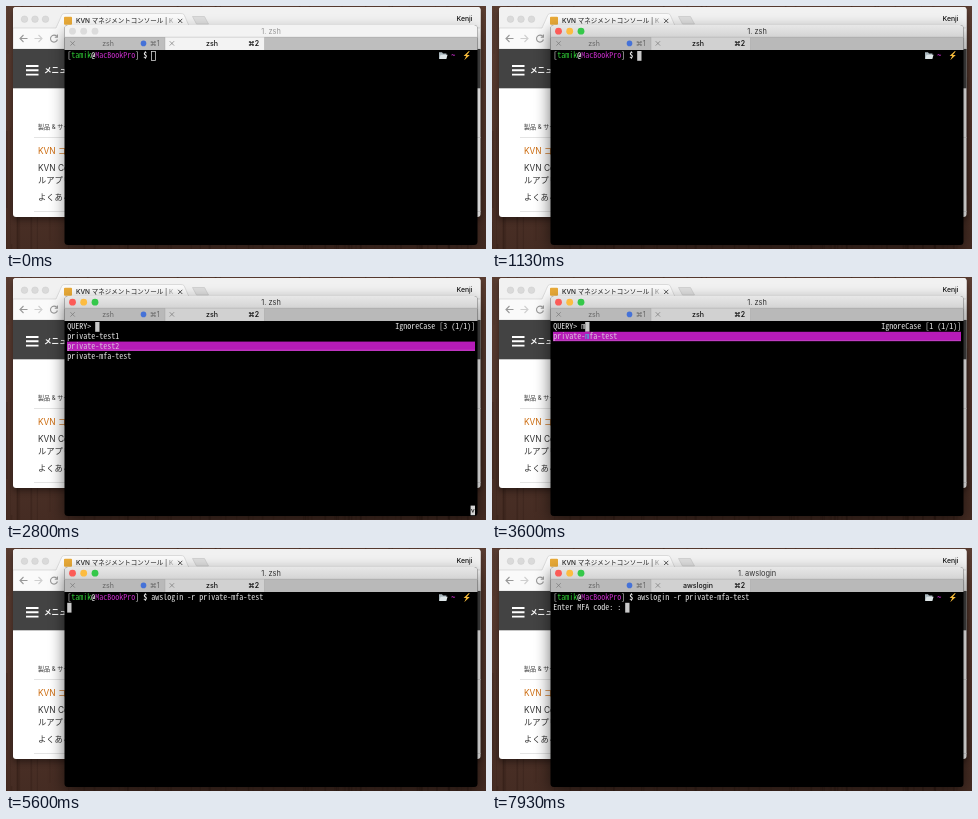
An HTML page for the animation above (8000 ms loop, 480 px wide and 243 px high).

```html
<!DOCTYPE html>
<html lang="ja">
<head>
<meta charset="utf-8">
<style>
html, body { margin: 0; width: 100%; height: 100%; overflow: hidden; background: #45291f; }
svg { display: block; width: 480px; height: 243px; }
text { white-space: pre; }
.ui { font-family: Inter, "Noto Sans CJK JP", "Noto Sans", sans-serif; }
.bar { font-family: Inter, "Noto Sans", "DejaVu Sans", sans-serif; }
.mono { font-family: "Noto Sans Mono CJK JP", "Noto Sans Mono", monospace; }
.mid { text-anchor: middle; }
</style>
</head>
<body>
<svg viewBox="0 0 480 243" width="480" height="243">
  <defs>
    <linearGradient id="wood" x2="0" y2="1">
      <stop offset="0" stop-color="#5a3d32"/>
      <stop offset=".6" stop-color="#503329"/>
      <stop offset="1" stop-color="#452c23"/>
    </linearGradient>
    <linearGradient id="titleOn" x2="0" y2="1">
      <stop offset="0" stop-color="#e9e9e9"/>
      <stop offset="1" stop-color="#d3d3d3"/>
    </linearGradient>
    <linearGradient id="fade">
      <stop offset="0" stop-color="#fafafa" stop-opacity="0"/>
      <stop offset="1" stop-color="#fafafa"/>
    </linearGradient>
    <filter id="blur" x="-20%" y="-20%" width="140%" height="140%"><feGaussianBlur stdDeviation="8"/></filter>
    <filter id="soft" x="-5%" y="-10%" width="110%" height="120%"><feGaussianBlur stdDeviation="3"/></filter>
    <clipPath id="page"><rect x="7" y="1" width="467.5" height="210" rx="3"/></clipPath>
    <clipPath id="win"><rect x="58.5" y="19" width="413" height="220" rx="3.5"/></clipPath>
  </defs>

  <rect width="480" height="243" fill="url(#wood)"/>
  <g id="grain" stroke="#24130d"></g>

  <rect x="7" y="4" width="467.5" height="210" rx="3" opacity=".4" filter="url(#soft)"/>
  <g clip-path="url(#page)" class="ui">
    <rect x="7" y="1" width="468" height="210" fill="#fff"/>
    <rect x="7" y="1" width="468" height="21" fill="#f1f1f1"/>
    <path d="M7 22H50L56 8.5Q57 7.5 59 7.5H175Q177 7.5 178 8.5L184 22H475V43H7Z" fill="#fafafa" stroke="#c9c9c9" stroke-width=".6"/>
    <path d="M186.5 10.5H198.5L202.5 18H190.5Z" fill="#dedede" stroke="#c4c4c4" stroke-width=".6"/>
    <g fill="#dadada" stroke="#c8c8c8" stroke-width=".4">
      <circle cx="18.5" cy="13.2" r="3.3"/><circle cx="29" cy="13.2" r="3.3"/><circle cx="39.5" cy="13.2" r="3.3"/>
    </g>
    <rect x="58" y="10.8" width="8" height="8" rx="1" fill="#e9aa38"/>
    <text x="70" y="17.1" font-size="6.5" font-weight="500" fill="#222">KVN マネジメントコンソール | K</text>
    <rect x="157" y="9" width="13" height="12" fill="url(#fade)"/>
    <path d="M172.1 12.8l4.2 4.2m0-4.2l-4.2 4.2" stroke="#444" stroke-width=".9"/>
    <text x="458.5" y="15.4" font-size="6.8" font-weight="500" fill="#111" class="mid">Kenji</text>
    <g fill="none" stroke-width="1.1">
      <path d="M21.5 32.5H14M17.5 29L14 32.5L17.5 36" stroke="#999"/>
      <path d="M28.5 32.5H36M32.5 29L36 32.5L32.5 36" stroke="#cfcfcf"/>
      <path d="M50.7 30.4A3.5 3.5 0 1 0 51.4 33.5M51.4 28.6V31.2H48.8" stroke="#999"/>
    </g>
    <rect x="7" y="43" width="468" height="39.3" fill="#434343"/>
    <path d="M20 60H32.5M20 64.3H32.5M20 68.6H32.5" stroke="#fff" stroke-width="1.9"/>
    <text x="38" y="67.3" font-size="7.6" font-weight="700" fill="#fff">メニュー</text>
    <text x="32" y="123.3" font-size="6" fill="#333">製品 &amp; サービス</text>
    <path d="M28 131.5H475M28 205.5H475" stroke="#ddd" stroke-width=".8"/>
    <g font-size="8.3" fill="#333">
      <text x="32" y="148.3" fill="#cc6a0c">KVN コンソール</text>
      <text x="32" y="165.2">KVN Console</text>
      <text x="32" y="177.3">ルアプリ</text>
      <text x="32" y="194.3">よくある質問</text>
    </g>
  </g>

  <rect id="shadow" x="58.5" y="25" width="413" height="217" rx="4" filter="url(#blur)"/>
  <g clip-path="url(#win)">
    <rect x="58" y="18" width="414" height="222"/>
    <rect id="titleBar" x="58" y="18" width="414" height="13.5"/>
    <rect id="tabs" x="58" y="31" width="414" height="13"/>
    <rect id="tab2" x="159" y="31" width="99.5" height="13"/>
    <path d="M58 31.2H472M159 31V44M258.5 31V44" stroke="#999" stroke-width=".5" opacity=".7"/>
    <g id="lights"><circle cx="66.5" cy="25.2" r="3.4"/><circle cx="77.7" cy="25.2" r="3.4"/><circle cx="89" cy="25.2" r="3.4"/></g>
    <g class="bar" font-size="7">
      <text id="title" x="265" y="28" font-size="7.4" class="mid"></text>
      <text x="102" y="39.9" fill="#666" class="mid">zsh</text>
      <text id="tabName" x="206" y="39.9" fill="#111" font-weight="500" class="mid"></text>
      <circle cx="137.5" cy="37.4" r="2.8" fill="#4572d8"/>
      <text x="148.8" y="39.9" fill="#666" class="mid">⌘1</text>
      <text x="247.5" y="39.9" fill="#111" font-weight="600" class="mid">⌘2</text>
    </g>
    <path d="M64.4 35.2l4.4 4.4m0-4.4l-4.4 4.4M163.7 35.2l4.4 4.4m0-4.4l-4.4 4.4" stroke="#777" stroke-width=".7"/>
    <g id="screen" class="mono"></g>
  </g>
</svg>
<script>
const LOOP = 8000, CELL = 4, ROW = 9.8, LEFT = 61.2, TOP = 45;
const WHITE = '#e6e6e6', GREEN = '#2fce35', MAGENTA = '#c42cc6', CYAN = '#35c9dc', BAR = '#b61bb8';
const $ = id => document.getElementById(id);
const set = (id, attr, value) => $(id).setAttribute(attr, value);
const px = col => LEFT + col * CELL;
const py = row => TOP + row * ROW;

// pick the type size that makes one character fill one cell
const pen = document.createElement('canvas').getContext('2d');
pen.font = '100px "Noto Sans Mono CJK JP", "Noto Sans Mono", monospace';
set('screen', 'font-size', CELL * 100 / pen.measureText('0').width);

let seed = 7;
const rand = () => (seed = seed * 16807 % 2147483647) / 2147483647;
let grain = '';
for (let i = 0; i < 150; i++) {
  const x = rand() * 480, y = rand() * 300 - 60;
  grain += `<path d="M${x} ${y}v${40 + rand() * 160}" stroke-width="${.5 + rand() * 1.5}" opacity="${.1 + rand() * .2}"/>`;
}
$('grain').innerHTML = grain;

const esc = s => s.replace(/&/g, '&amp;').replace(/>/g, '&gt;');
const put = (col, row, s, fill = WHITE, weight = 400) =>
  `<text x="${px(col)}" y="${py(row) + 7.4}" fill="${fill}" font-weight="${weight}">${esc(s)}</text>`;

const cursor = (col, row, hollow) => hollow
  ? `<rect x="${px(col) + .3}" y="${py(row) + .5}" width="${CELL}" height="9" fill="none" stroke="#d0d0d0" stroke-width=".8"/>`
  : `<rect x="${px(col)}" y="${py(row)}" width="${CELL + .3}" height="${ROW}" fill="#c9c9c9"/>`;

const status = `<path d="M433 46.2h3l1 1.2h3.4v5.4h-7.4z" fill="#a9b7bd"/>
  <path d="M434.6 48.8h7l-1.4 4.2h-7z" fill="#dce4e6"/>
  <path d="M462.6 45.2l-5 4.9h2.6l-2 4.1 5.6-5.2h-2.9l2.9-3.8z" fill="#f4b93a"/>` + put(96, 0, '~', MAGENTA, 700);

const prompt = () => put(0, 0, '[') + put(1, 0, 'tamik', GREEN) + put(6, 0, '@', WHITE, 700) +
  put(7, 0, 'MacBookPro', MAGENTA) + put(17, 0, ']') + put(19, 0, '$', WHITE, 700) + status;

function picker(query, selected) {
  const items = ['private-test1', 'private-test2', 'private-mfa-test'].filter(s => s.includes(query));
  let out = put(0, 0, 'QUERY> ' + query) + cursor(7 + query.length, 0) +
    put(82, 0, `IgnoreCase [${items.length} (1/1)]`);
  items.forEach((item, i) => {
    const row = i + 1, on = i === selected, y = py(row);
    if (on) out += `<rect x="61" y="${y}" width="408" height="9.4" fill="${BAR}"/>
      <path d="M61 ${y + 8.6}H469" stroke="#e4b4e4" stroke-width=".5" opacity=".5"/>`;
    out += put(0, row, item, on ? '#dcc3dc' : WHITE);
    if (query) {
      const at = item.indexOf(query);
      out += `<rect x="${px(at)}" y="${y}" width="${query.length * CELL}" height="8.3" fill="${BAR}"/>` +
        put(at, row, query, CYAN);
    }
  });
  if (!query) out += `<rect x="464.6" y="228.6" width="4.4" height="9.6" fill="#d4d4d4"/>
    <path d="M465.4 232l1.4 3.4 1.4-3.4" fill="none" stroke="#222" stroke-width=".8"/>`;
  return out;
}

function screen(t) {
  if (t < 2400) return prompt() + cursor(21, 0, t < 270);
  if (t < 5530) {
    const query = 'mfa'.slice(0, [3330, 3870, 4130].filter(at => t >= at).length);
    return picker(query, t >= 2670 && !query ? 1 : 0);
  }
  const run = prompt() + put(21, 0, 'awslogin -r private-mfa-test');
  if (t < 6070) return run + cursor(0, 1);
  return run + put(0, 1, 'Enter MFA code: : ') + cursor(18, 1, t >= 6470 && t < 7130);
}

let last = '';
function draw(t) {
  const active = t >= 270;
  const name = t < 5870 ? 'zsh' : 'awslogin';
  const tab = t < 5730 ? 'zsh' : 'awslogin';
  const body = screen(t);
  const key = active + name + tab + body;
  if (key === last) return;
  last = key;
  set('shadow', 'opacity', active ? .58 : .4);
  set('titleBar', 'fill', active ? 'url(#titleOn)' : '#f3f3f3');
  set('tabs', 'fill', active ? '#b9b9b9' : '#bebebe');
  set('tab2', 'fill', active ? '#d1d1d1' : '#f3f3f3');
  set('title', 'fill', active ? '#333' : '#999');
  const lights = active ? ['#fc5b57', '#fdbc40', '#35c84a'] : ['#dcdcdc', '#dcdcdc', '#dcdcdc'];
  [...$('lights').children].forEach((c, i) => c.setAttribute('fill', lights[i]));
  $('title').textContent = '1. ' + name;
  $('tabName').textContent = tab;
  $('screen').innerHTML = body;
}

const start = performance.now();
function tick() {
  draw((performance.now() - start) % LOOP);
  requestAnimationFrame(tick);
}
tick();
</script>
</body>
</html>
```
